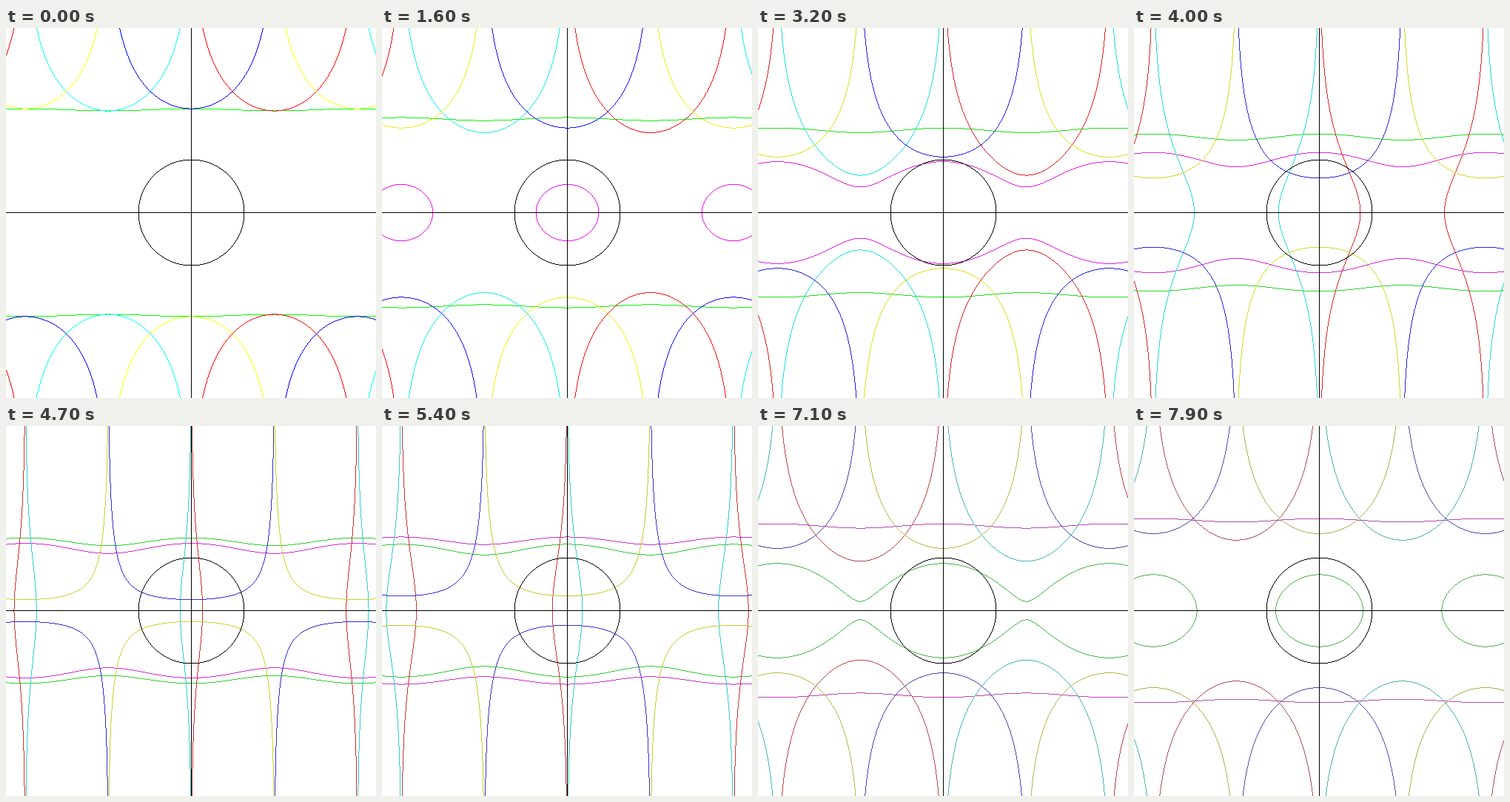
These frames come from a looping animation (500 by 500 pixels, 8000 ms). A matplotlib script:

```python
import numpy as np
import matplotlib.pyplot as plt
from matplotlib.animation import FuncAnimation

# Level curves of sin(z): real part, imaginary part and modulus
SIZE, FRAMES, STEPS = 500, 80, 100
UNIT = SIZE / 7
LIMIT = 3.5

pixel = np.arange(SIZE)
X, Y = np.meshgrid((pixel - 250) / UNIT, (249 - pixel) / UNIT)


def field(values):
    """Pair a field with its half-pixel tolerance for one-pixel lines."""
    dy, dx = np.gradient(values)
    return values, np.maximum(abs(dx), abs(dy)) / 2


RE = field(np.sin(X) * np.cosh(Y))
IM = field(np.cos(X) * np.sinh(Y))
MOD = field(np.hypot(np.sin(X), np.sinh(Y)))


def level(curve, value):
    values, tolerance = curve
    return abs(values - value) < tolerance


def fade(rgb, n):
    return [255 - n if on else n for on in rgb]


INK = (level(field(X), 0) | level(field(Y), 0)
       | level(field(np.hypot(X, Y)), 1))


def render(n):
    p = n / STEPS
    c = LIMIT * (1 - 2 * p)
    layers = [
        (MOD, LIMIT * (1 - p), (0, 1, 0)),
        (MOD, LIMIT * p, (1, 0, 1)),
        (RE, c, (1, 0, 0)),
        (RE, -c, (0, 1, 1)),
        (IM, -c, (1, 1, 0)),
        (IM, c, (0, 0, 1)),
    ]
    img = np.full((SIZE, SIZE, 3), 255, np.uint8)
    for curve, value, rgb in layers:
        img[level(curve, value)] = fade(rgb, n)
    img[INK] = 0
    return img


fig = plt.figure(figsize=(5, 5), dpi=100, facecolor="white")
ax = fig.add_axes([0, 0, 1, 1])
ax.axis("off")
view = ax.imshow(render(0), interpolation="nearest")


def draw(n):
    view.set_data(render(n))
    return [view]


anim = FuncAnimation(fig, draw, frames=FRAMES, interval=100,
                     repeat=True, repeat_delay=0, blit=False)
plt.show()
```
